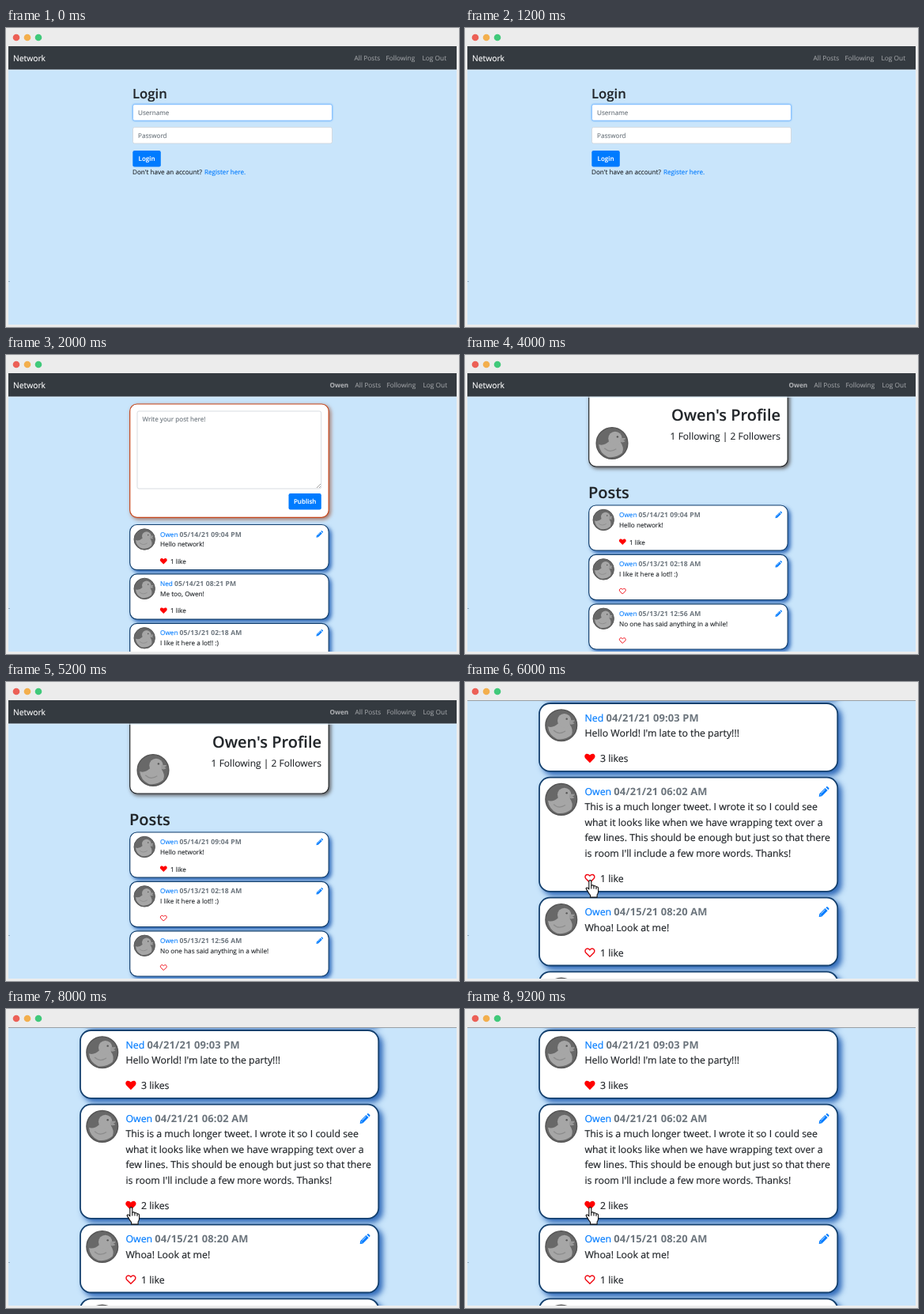
Animation, 573 px wide and 378 px high, one loop 10 s. Source, as an HTML page:

```html
<!DOCTYPE html>
<html lang="en">
<head>
<meta charset="utf-8">
<title>Network demo</title>
<style>
  html, body { margin: 0; width: 100%; height: 100%; overflow: hidden; background: #ececec; }
  svg { display: block; width: 573px; height: 378px; }
  text {
    font-family: "Open Sans", "Noto Sans", sans-serif; font-size: 8.15px;
    color: #212529; fill: currentColor; stroke: currentColor; stroke-width: .12;
    white-space: pre; text-rendering: geometricPrecision;
  }
  .scene { visibility: hidden; animation: show 10s step-end infinite; }
  @keyframes show {
    0% { visibility: visible; }
    20%, 100% { visibility: hidden; }
  }
  .brand { font-size: 10.3px; color: #fff; }
  .nav { font-size: 8.35px; color: #9a9da0; }
  .user { font-size: 8.2px; font-weight: 700; color: #abadb0; }
  .title { font-weight: 600; font-size: 16.7px; }
  .big { font-size: 20px; }
  .stats { font-size: 12.05px; }
  .hint { color: #6c757d; }
  .link { color: #007bff; fill: currentColor; stroke: currentColor; }
  .btn { font-weight: 600; font-size: 8px; color: #fff; text-anchor: middle; }
  .end { text-anchor: end; }
  .post text { font-size: 8.22px; }
  .date { font-size: 8.6px; font-weight: 700; letter-spacing: .1px; fill: #6c757d; stroke: none; }
  .card { fill: #fff; stroke-width: 1.2; }
  .blue { stroke: #14406e; filter: drop-shadow(3.2px 3.2px 2.6px rgba(25, 88, 175, .88)); }
  .orange { stroke: #c5461c; filter: drop-shadow(2.9px 2.9px 2.4px rgba(150, 75, 45, .75)); }
  .dark { stroke: #24282c; filter: drop-shadow(2.9px 2.9px 2.4px rgba(60, 50, 45, .8)); }
  .field { fill: #fff; stroke: #ced4da; stroke-width: .8; }
  .focus { stroke: #80bdff; filter: drop-shadow(0 0 1px rgba(0, 123, 255, .55)); }
</style>
</head>
<body>
<svg viewBox="0 0 573 378">
  <defs>
    <clipPath id="page"><rect x="3" y="23" width="567" height="352"/></clipPath>
    <g id="avatar">
      <circle r="13.2" fill="#686868" stroke="#565656" stroke-width="1"/>
      <path d="M-11.2 1Q-7 2.6-2.4-1.6L7-1Q10.6 3.6 8.6 8.2Q3.5 12.6-3.5 11.6Q-10.4 8.6-11.2 1Z" fill="#a6a6a6"/>
      <circle cx="2.6" cy="-4" r="5.8" fill="#a6a6a6"/>
      <path d="M7-4.4L11.2-4.4Q11.4-3 9.4-2.6L11.2-1.6Q9.6-.2 6.8-1Z" fill="#999"/>
      <path d="M-6.5 4.2Q-2 8.5 3.5 4.8" fill="none" stroke="#8c8c8c" stroke-width=".8"/>
      <circle cx="4.6" cy="-5.4" r=".8" fill="#555"/>
    </g>
    <path id="heart" d="M0 3.8L-3.8 0C-4.8-1.1-4.6-2.9-3.3-3.6C-2.2-4.1-.9-3.6 0-2.6C.9-3.6 2.2-4.1 3.3-3.6C4.6-2.9 4.8-1.1 3.8 0Z"/>
    <g id="pencil">
      <path fill="#007bff" d="M-4.2 4.2L-3.8 1.7L1-3.1L3.1-1L-1.7 3.8ZM1.6-3.7L2.2-4.2Q2.7-4.6 3.2-4.1L4.1-3.2Q4.6-2.7 4.2-2.2L3.7-1.6Z"/>
      <path d="M-3.1 2.3L-2.3 3.1M-2.4 1.5L1 -1.9" fill="none" stroke="#fff" stroke-width=".55"/>
    </g>
    <g id="hand" fill="#fff" stroke="#111" stroke-width="1.1" stroke-linejoin="round">
      <path d="M-1.5 1.5Q-1.5 0 0 0Q1.5 0 1.5 1.5V7.2Q1.6 6.2 3 6.2Q4.6 6.4 4.6 7.6Q5 6.9 6.2 7.1Q7.6 7.3 7.7 8.6Q8.2 8 9.2 8.4Q10.3 8.8 10.3 10.2V14Q10.3 16.5 8.8 18.5V21.5H.3V19Q-2 16.5-3.4 13.5L-5 11Q-5.4 9.6-4.2 9.4Q-3 9.2-1.5 11.4Z"/>
      <path d="M1.5 7V10.8M4.6 7.6V11M7.7 8.6V11.4" fill="none"/>
    </g>
  </defs>
  <rect width="573" height="378" fill="#ececec"/>
  <circle cx="13" cy="12" r="4.3" fill="#ec6056"/>
  <circle cx="27" cy="12" r="4.3" fill="#f3af4d"/>
  <circle cx="41" cy="12" r="4.3" fill="#40c97a"/>
  <rect x="3" y="23" width="567" height="352" fill="#c9e5fb"/>
  <g id="stage" clip-path="url(#page)"></g>
  <rect x="3" y="320" width="2" height="1" fill="#8fabc2"/>
</svg>
<script>
const ME = "Owen", PAL = "Ned";

const text = (x, y, str, cls = "") => `<text x="${x}" y="${y}" class="${cls}">${str}</text>`;
const box = (x, y, w, h, r, cls) => `<rect x="${x}" y="${y}" width="${w}" height="${h}" rx="${r}" class="${cls}"/>`;
const use = (id, x, y, scale = 1, attrs = "") =>
  `<use href="#${id}" transform="translate(${x} ${y}) scale(${scale})" ${attrs}/>`;

function button(x, y, w, label) {
  return `<rect x="${x}" y="${y}" width="${w}" height="20.5" rx="2.2" fill="#007bff"/>` +
    text(x + w / 2, y + 13, label, "btn");
}

function navbar(user) {
  const x = user ? 441.5 : 440.5;
  return `<rect x="3" y="23" width="567" height="29.7" fill="#343a40"/>
    <rect x="3" y="52.7" width="567" height="1" fill="#dceefb"/>` +
    text(9, 41.7, "Network", "brand") +
    (user ? text(409.5, 41, user, "user") : "") +
    text(x, 41, "All Posts", "nav") +
    text(x + 40, 41, "Following", "nav") +
    text(x + 86, 41, "Log Out", "nav");
}

// One post card in its own units, its corner at 0,0.
function post(name, date, lines, likes, liked) {
  const low = (lines.length - 1) * 13;
  const heart = liked
    ? use("heart", 42.6, 46.3 + low, 1, 'fill="#f00"')
    : use("heart", 42.6, 46.3 + low, .89, 'fill="none" stroke="#f00a14" stroke-width="1.1"');
  return box(0, 0, 251.5, 57.2 + low, 9, "card blue") +
    use("avatar", 18.5, 18.5) +
    `<text x="38.3" y="15"><tspan class="link">${name}</tspan> <tspan class="date">${date}</tspan></text>` +
    lines.map((line, i) => text(38.3, 27.9 + i * 13, line)).join("") +
    heart +
    (likes ? text(51.3, 49.5 + low, likes + (likes > 1 ? " likes" : " like")) : "") +
    (name === ME ? use("pencil", 240, 12) : "");
}

// Stacks posts downwards from x,y.
function feed(x, y, scale, posts) {
  let top = 0;
  const cards = posts.map(p => {
    const card = `<g transform="translate(0 ${top})">${post(...p)}</g>`;
    top += 62.4 + (p[2].length - 1) * 13;
    return card;
  });
  return `<g class="post" transform="translate(${x} ${y}) scale(${scale})">${cards.join("")}</g>`;
}

const hello = [ME, "05/14/21 09:04 PM", ["Hello network!"], 1, true];
const lot = likes => [ME, "05/13/21 02:18 AM", ["I like it here a lot!! :)"], likes, false];

const login = navbar() +
  text(160, 89, "Login", "title") +
  box(160.5, 96.7, 252, 20.3, 2.2, "field focus") + text(167, 110, "Username", "hint") +
  box(160.5, 125.6, 252, 20.3, 2.2, "field") + text(167, 139, "Password", "hint") +
  button(160.3, 155, 35.5, "Login") +
  text(160, 185, "Don't have an account?") +
  text(251, 185, "Register here.", "link");

const allPosts =
  box(156.7, 62, 251.5, 143.3, 9, "card orange") +
  box(166, 71, 232.7, 98, 2.2, "field") +
  text(172.5, 84, "Write your post here!", "hint") +
  '<path d="M393 168L398 163M396 168L398 166" stroke="#777" stroke-width=".7"/>' +
  button(357.5, 175, 41.3, "Publish") +
  feed(156.7, 214.5, 1, [
    hello,
    [PAL, "05/14/21 08:21 PM", [`Me too, ${ME}!`], 1, true],
    lot(0)
  ]) + navbar(ME);

const profile =
  box(156.7, 35, 251.5, 106, 9, "card dark") +
  use("avatar", 186, 111.5, 1.5) +
  text(399, 83, `${ME}'s Profile`, "title big end") +
  text(399, 106.7, "1 Following | 2 Followers", "stats end") +
  text(156, 181, "Posts", "title big") +
  feed(156.7, 190, 1, [
    hello,
    lot(0),
    [ME, "05/13/21 12:56 AM", ["No one has said anything in a while!"], 0, false]
  ]) + navbar(ME);

const zoomed = liked => feed(94, 27 - 93.6, 1.5, [
  [PAL, "04/22/21 10:12 AM", [""], 1, true],
  [PAL, "04/21/21 09:03 PM", ["Hello World! I'm late to the party!!!"], 3, true],
  [ME, "04/21/21 06:02 AM", [
    "This is a much longer tweet. I wrote it so I could see",
    "what it looks like when we have wrapping text over a",
    "few lines. This should be enough but just so that there",
    "is room I'll include a few more words. Thanks!"
  ], liked ? 2 : 1, liked],
  [ME, "04/15/21 08:20 AM", ["Whoa! Look at me!"], 1, false],
  [PAL, "04/14/21 07:45 PM", [""], 1, true]
]) +
  '<rect x="3" y="23" width="567" height="1" fill="#9a9fa4"/>' +
  use("hand", 158.3, 250.6);

const scenes = [login, allPosts, profile, zoomed(false), zoomed(true)];
document.getElementById("stage").innerHTML = scenes
  .map((body, i) => `<g class="scene" style="animation-delay:${i ? i * 2 - 10 : 0}s">${body}</g>`)
  .join("");
</script>
</body>
</html>
```
